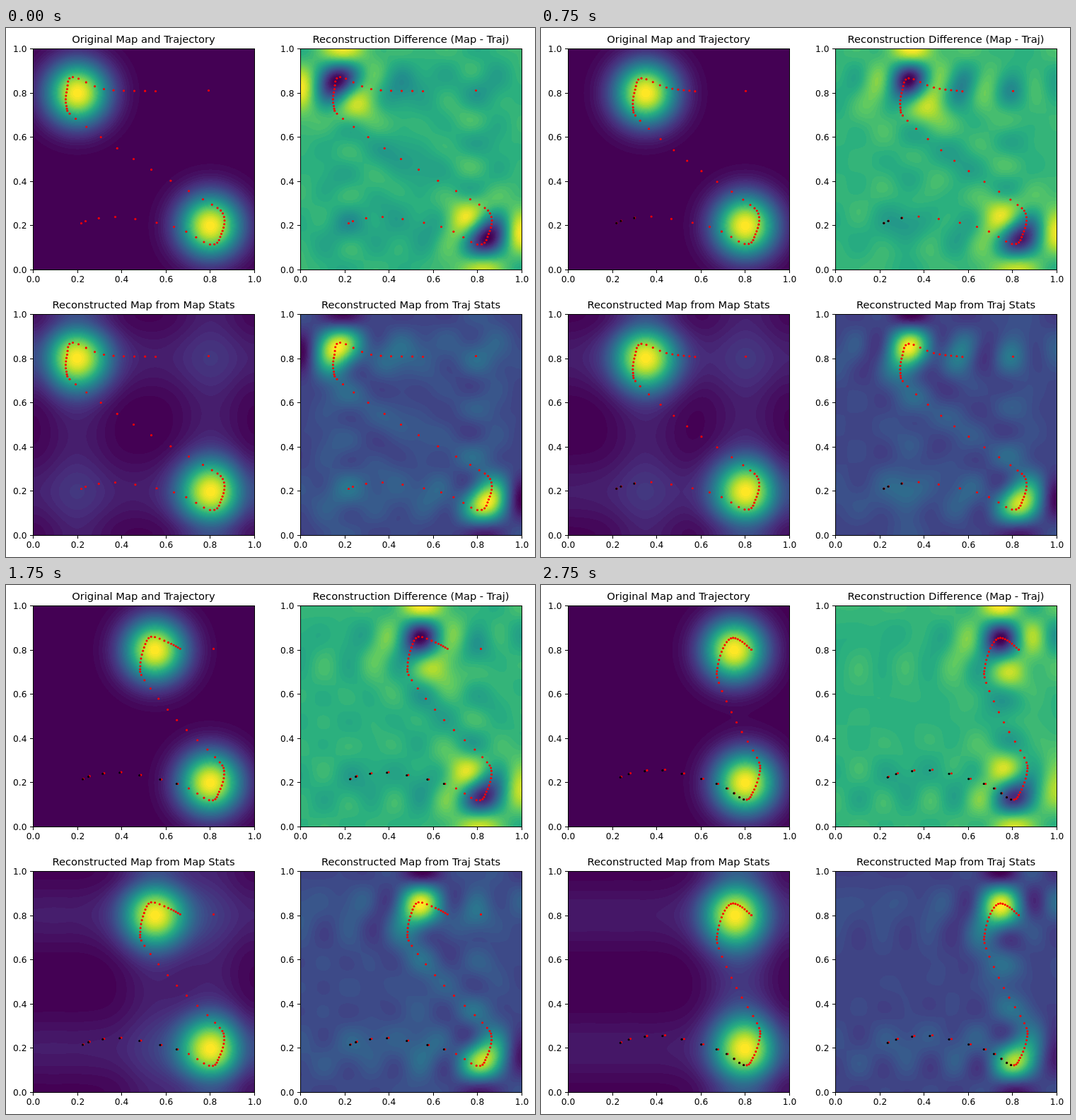
An HTML page with a canvas for the animation above (3.25 s loop, 748x749 px).

```html
<!DOCTYPE html>
<html lang="en">
<head>
<meta charset="utf-8">
<title>Map and trajectory statistics</title>
<style>
html, body { margin: 0; width: 100%; height: 100%; overflow: hidden; background: #fff; }
canvas { display: block; width: 100vw; height: 100vh; }
</style>
</head>
<body>
<canvas id="stage" width="748" height="749"></canvas>
<script>
const ctx = document.getElementById('stage').getContext('2d');
const STEP = 250, STEPS = 12, LOOP = 3250;
const ORDER = 10, BANDS = 50, SPAN = 313, SIZE = SPAN + 1;
const LEFT = 38, RIGHT = 416, TOP = 29, BOTTOM = 405;
const FONT = '"DejaVu Sans", sans-serif';

const panels = [
  { x: LEFT, y: TOP, title: 'Original Map and Trajectory' },
  { x: RIGHT, y: TOP, title: 'Reconstruction Difference (Map - Traj)' },
  { x: LEFT, y: BOTTOM, title: 'Reconstructed Map from Map Stats' },
  { x: RIGHT, y: BOTTOM, title: 'Reconstructed Map from Traj Stats' }
];

const linear = s => s;
const late = s => s * s;

// Key points of the planned path: sample number, first and last place, easing between them.
const keys = [
  { n: 0, from: [106, 276], to: [113, 271], ease: late },
  { n: 1, from: [112, 273], to: [126, 266], ease: late },
  { n: 3, from: [154, 267], to: [175, 261], ease: late },
  { n: 6, from: [237, 281], to: [250, 281], ease: late },
  { n: 10, from: [288, 306], to: [286, 303], ease: linear },
  { n: 15, from: [304, 291], to: [299, 293], ease: linear },
  { n: 21, from: [306, 262], to: [309, 263], ease: linear },
  { n: 25, from: [278, 242], to: [305, 244], ease: linear },
  { n: 29, from: [180, 185], to: [276, 194], ease: linear },
  { n: 33, from: [98, 128], to: [251, 138], ease: linear },
  { n: 37, from: [85, 110], to: [249, 117], ease: linear },
  { n: 42, from: [86, 86], to: [257, 89], ease: linear },
  { n: 46, from: [94, 69], to: [268, 75], ease: linear },
  { n: 50, from: [138, 86], to: [281, 78], ease: linear },
  { n: 55, from: [211, 89], to: [297, 91], ease: late }
];
const LAST = keys.length - 1, SAMPLES = keys[LAST].n + 1;

const mix = (a, b, t) => a + (b - a) * t;

const viridis = ['440154', '472d7b', '3b528b', '2c728e', '21918c', '28ae80', '5ec962', 'addc30', 'fde725']
  .map(h => [0, 2, 4].map(i => parseInt(h.slice(i, i + 2), 16)));
const bandColors = Array.from({ length: BANDS }, (_, i) => {
  const p = i / (BANDS - 1) * (viridis.length - 1);
  const k = Math.min(viridis.length - 2, Math.floor(p));
  return viridis[k].map((c, j) => Math.round(mix(c, viridis[k + 1][j], p - k)));
});

// Smooth curve through one coordinate of the key points, read at sample n.
function curve(values, n) {
  let k = 0;
  while (k < LAST - 1 && keys[k + 1].n <= n) k++;
  const slope = j => {
    const a = Math.max(0, j - 1), b = Math.min(LAST, j + 1);
    return (values[b] - values[a]) / (keys[b].n - keys[a].n);
  };
  const h = keys[k + 1].n - keys[k].n, t = (n - keys[k].n) / h, u = 1 - t;
  return values[k] * u * u * (1 + 2 * t) + values[k + 1] * t * t * (3 - 2 * t)
    + h * t * u * (slope(k) * u - slope(k + 1) * t);
}

// All samples of the plan made at a step, in pixels of the first panel, and its goal.
function plan(step) {
  const s = step / (STEPS - 1);
  const [xs, ys] = [0, 1].map(a => keys.map(k => mix(k.from[a], k.to[a], k.ease(s))));
  const points = Array.from({ length: SAMPLES }, (_, n) => [curve(xs, n), curve(ys, n)]);
  points.push([mix(286, 297, s), mix(88, 91, s)]);
  return points;
}

// The path lingers under the lower peak and above the upper one.
const hump = (n, center, width) => Math.exp(-(((n - center) / width) ** 2));
const dwell = n => 1 + 2.2 * hump(n, 13, 4) + 3.2 * hump(n, 45, 3);

const bell = d => Math.exp(-50 * d * d);
const cosines = x => Array.from({ length: ORDER }, (_, k) => Math.cos(k * Math.PI * x));

// Cosine coefficients of weighted separable parts, scaled so that the first is 1.
function coefficients(parts) {
  const sum = (i, j) => parts.reduce((s, { cx, cy, weight }) => s + weight * cx[i] * cy[j], 0);
  const norm = k => (k ? Math.SQRT2 : 1), total = sum(0, 0);
  return Array.from({ length: ORDER }, (_, i) =>
    Array.from({ length: ORDER }, (_, j) => sum(i, j) / total * norm(i) * norm(j)));
}

function bellCosines(m) {
  const sum = new Array(ORDER).fill(0), N = 100;
  for (let s = 0; s < N; s++) {
    const x = (s + 0.5) / N, g = bell(x - m);
    cosines(x).forEach((v, k) => { sum[k] += v * g; });
  }
  return sum;
}

const gridCos = Array.from({ length: SIZE }, (_, i) => cosines(i / SPAN));

function reconstruct(c) {
  const out = new Float32Array(SIZE * SIZE);
  for (let r = 0; r < SIZE; r++) {
    const cy = gridCos[SPAN - r];
    const row = c.map(a => a.reduce((s, v, j) => s + v * cy[j], 0));
    for (let q = 0; q < SIZE; q++) {
      const cx = gridCos[q];
      let s = 0;
      for (let k = 0; k < ORDER; k++) s += row[k] * cx[k];
      out[r * SIZE + q] = s;
    }
  }
  return out;
}

function density(centers) {
  return new Float32Array(SIZE * SIZE).map((_, i) => {
    const x = (i % SIZE) / SPAN, y = 1 - Math.floor(i / SIZE) / SPAN;
    return centers.reduce((s, [mx, my]) => s + bell(x - mx) * bell(y - my), 0);
  });
}

function drawField(panel, field) {
  let lo = Infinity, hi = -Infinity;
  for (const v of field) { lo = Math.min(lo, v); hi = Math.max(hi, v); }
  const image = ctx.createImageData(SIZE, SIZE);
  field.forEach((v, i) => {
    const band = Math.min(BANDS - 1, Math.floor((v - lo) / (hi - lo) * BANDS));
    const [r, g, b] = bandColors[band];
    image.data.set([r, g, b, 255], i * 4);
  });
  ctx.putImageData(image, panel.x, panel.y);
}

function drawDots(panel, points, color) {
  const dx = panel.x - LEFT + 0.5, dy = panel.y - TOP + 0.5;
  ctx.fillStyle = color;
  for (const [x, y] of points) {
    ctx.beginPath();
    ctx.arc(x + dx, y + dy, 1.55, 0, 2 * Math.PI);
    ctx.fill();
  }
}

function drawAxes({ x, y, title }) {
  ctx.strokeStyle = ctx.fillStyle = '#000';
  ctx.lineWidth = 1;
  ctx.strokeRect(x + 0.5, y + 0.5, SPAN, SPAN);
  ctx.font = '12.2px ' + FONT;
  ctx.beginPath();
  for (let i = 0; i <= 5; i++) {
    const label = (i / 5).toFixed(1), d = Math.round(SPAN * i / 5);
    const tx = x + d + 0.5, ty = y + SPAN - d + 0.5;
    ctx.moveTo(tx, y + SPAN + 1);
    ctx.lineTo(tx, y + SPAN + 5);
    ctx.moveTo(x, ty);
    ctx.lineTo(x - 4, ty);
    ctx.textAlign = 'center';
    ctx.fillText(label, tx, y + SPAN + 18);
    ctx.textAlign = 'right';
    ctx.fillText(label, x - 8.5, ty + 4.5);
  }
  ctx.stroke();
  ctx.textAlign = 'center';
  ctx.font = '14.7px ' + FONT;
  ctx.fillText(title, x + SPAN / 2, y - 8);
}

function render(step) {
  const centers = [[0.2 + 0.05 * step, 0.8], [0.8, 0.2]];
  const points = plan(step);
  const done = step ? plan(step - 1).slice(0, step) : [];

  const mapStats = coefficients(centers.map(([x, y]) =>
    ({ cx: bellCosines(x), cy: bellCosines(y), weight: 1 })));
  const trajStats = coefficients(points.map(([x, y], n) => ({
    cx: cosines((x - LEFT) / SPAN),
    cy: cosines((TOP + SPAN - y) / SPAN),
    weight: dwell(n)
  })));
  const fromMap = reconstruct(mapStats), fromTraj = reconstruct(trajStats);
  const fields = [density(centers), fromMap.map((v, i) => v - fromTraj[i]), fromMap, fromTraj];

  ctx.fillStyle = '#fff';
  ctx.fillRect(0, 0, 748, 749);
  panels.forEach((panel, i) => {
    drawField(panel, fields[i]);
    drawDots(panel, points, '#f00');
    drawDots(panel, done, '#000');
    drawAxes(panel);
  });
}

const start = performance.now();
let shown = -1;
function tick() {
  const time = (performance.now() - start) % LOOP;
  const step = Math.min(STEPS - 1, Math.floor(time / STEP));
  if (step !== shown) {
    shown = step;
    render(step);
  }
  requestAnimationFrame(tick);
}
tick();
</script>
</body>
</html>
```
